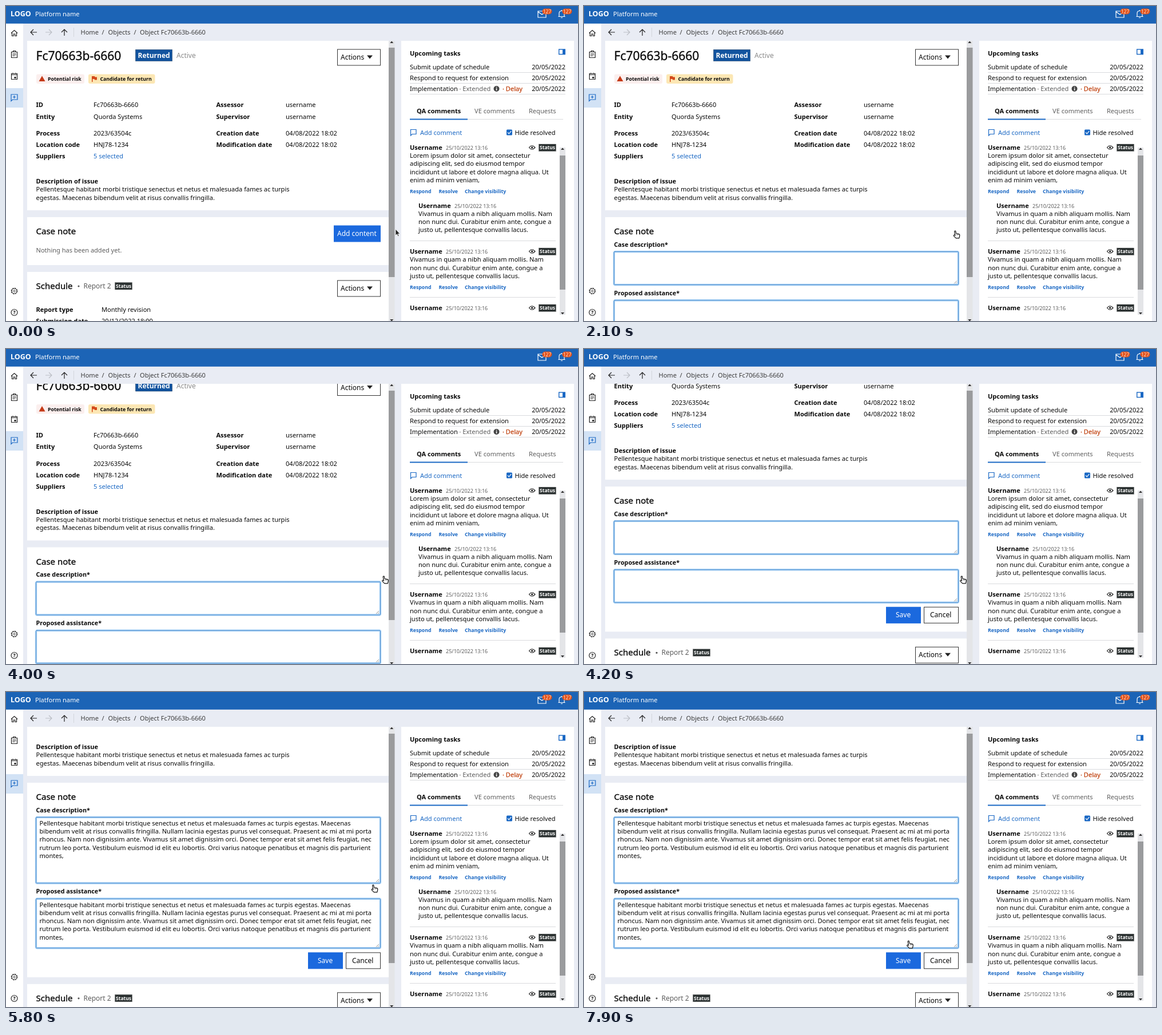
Animation, 1000 px wide and 552 px high, one loop 8000 ms. Source, as an HTML page:

```html
<!DOCTYPE html>
<html lang="en">
<head>
<meta charset="utf-8">
<title>Case note form</title>
<style>
html, body { margin: 0; width: 100%; height: 100%; overflow: hidden; background: #e9ecf4 }
svg { display: block; width: 100%; height: 100% }
text { font: 11.05px "Noto Sans", "Open Sans", sans-serif; fill: #080808; white-space: pre }
.b { font-weight: 700 }
.s { font-weight: 600 }
.f { font-size: 10.75px; font-weight: 600 }
.h { font-size: 15px; stroke: #080808; stroke-width: .3 }
.m { font-size: 12px }
.g { fill: #5c5c5c }
.l { fill: #1a68c4 }
.w { fill: #fff }
.t { font-size: 9px }
.t.s { font-size: 8.75px }
.line { fill: none; stroke: #222; stroke-width: 1.2 }
</style>
</head>
<body>
<svg id="stage" viewBox="0 0 1000 552"></svg>
<script>
const T = (x, y, s, cls = '', more = '') => `<text x="${x}" y="${y}" class="${cls}" ${more}>${s}</text>`;
const R = (x, y, w, h, fill, more = '') => `<rect x="${x}" y="${y}" width="${w}" height="${h}" fill="${fill}" ${more}/>`;
const P = (d, fill, more = '') => `<path d="${d}" fill="${fill}" ${more}/>`;
const L = (d, more = '') => `<path d="${d}" class="line" ${more}/>`;
const G = (id, body) => `<g id="${id}">${body}</g>`;
const lines = (x, y, list) => list.map((s, i) => T(x, y + i * 14.3, s)).join('');
const card = (y, h) => R(37, y, 632, h, '#fff');
const button = (x, y, w, s, tx, solid) =>
  R(x + .5, y + .5, w - 1, 28, solid ? '#1b69de' : '#fff', `stroke="${solid ? '#1b69de' : '#333'}"`) +
  T(tx, y + 18.6, s, solid ? 'm w' : 'm');
const actions = y => button(579, y, 76, 'Actions', 585) + P(`M631 ${y + 11}h10l-5 6z`, '#222');
const status = (x, y) => R(x, y, 30, 12.5, '#2b3131', 'stroke="#555" stroke-width=".6" stroke-dasharray="1 1"') +
  T(x + 1.6, y + 9.4, 'Status', 's w', 'style="font-size:8.5px"');
const field = id => R(52.5, 0, 602, 58, '#fff', `id="${id}o" rx="2" stroke="#a3d0f7" stroke-width="3.4"`) +
  R(52.5, 0, 602, 58, 'none', `id="${id}i" rx="1.5" stroke="#12549f" stroke-dasharray="1 1"`) +
  `<path id="${id}h" d="M647 -2l5-5M650 -2l2-2" stroke="#777" stroke-width=".8"/>`;

const lorem = ['Pellentesque habitant morbi tristique senectus et netus et malesuada fames ac turpis egestas. Maecenas',
  'bibendum velit at risus convallis fringilla. Nullam lacinia egestas purus vel consequat. Praesent ac mi at mi porta',
  'rhoncus. Nam non dignissim ante. Vivamus sit amet dignissim orci. Donec tempor erat sit amet felis feugiat, nec',
  'rutrum leo porta. Vestibulum euismod id elit eu lobortis. Orci varius natoque penatibus et magnis dis parturient',
  'montes,'];

function header() {
  const badge = x => R(x - 8.5, 4.5, 17, 10, '#e2531d', 'rx="5"') +
    T(x, 12.6, '127', '', 'text-anchor="middle" style="font-size:8.5px;fill:#ffdcc4"');
  return R(0, 0, 1000, 30.8, '#1c64b6') +
    T(8, 18.4, 'LOGO', 'b w', 'style="font-size:12.5px"') + T(51, 18, 'Platform name', 'w') +
    L('M930 9h14v11h-14zM930 10l7 5 7-5', 'style="stroke:#fff"') +
    L('M965.5 18.5h12M967 18v-5q0-4.5 4.5-4.5t4.5 4.5v5M970 20.5h3M971.5 7v1.5', 'style="stroke:#fff"') +
    badge(946) + badge(981);
}

function sidebar() {
  const ring = (r, more = '') => `<circle cx="14.5" cy="499.5" r="${r}" class="line" ${more}/>`;
  return R(0, 30, 30, 522, '#fff') + R(0, 144, 30, 34, '#d2e2f5') +
    L('M9 47.5l5.5-5 5.5 5M10.5 47v5.5h2.7v-3.5h2.6v3.5h2.7v-5.5') +
    L('M9.5 80.5h10v10h-10zM12.5 80v-1.5h4v1.5') + L('M11.5 83.5h6M11.5 85.5h6M11.5 87.5h4', 'style="stroke-width:.8"') +
    L('M9.5 118.5h10v10h-10zM9.5 120.500h10M12 117v2M17 117v2') + R(14.5, 124, 3, 3, '#222') +
    L('M9 155h11v9h-8.5l-2.500 2.500zM14.500 157v5M12 159.500h5', 'style="stroke:#1a68c4"') +
    ring(4.5) + ring(5.4, 'stroke-dasharray="2.12 2.12" style="stroke-width:1"') + ring(1.6, 'style="stroke-width:.9"') +
    '<circle cx="14.5" cy="537" r="5.5" class="line"/>' + T(14.5, 540.2, '?', 's t', 'text-anchor="middle"');
}

function toolbar() {
  return L('M54 46H43M48 41l-5 5 5 5') + L('M69 46h11M75 41l5 5-5 5', 'style="stroke:#bbbec5"') +
    L('M102 52V41M97 46l5-5 5 5') + R(118, 38, 1, 16, '#d3d6dc') +
    [[130.5, 'Home'], [167.5, '/'], [178.5, 'Objects'], [223.5, '/'], [234, 'Object Fc70663b-6660']]
      .map(([x, s]) => T(x, 50, s, '', 'style="fill:#3c3c3c"')).join('');
}

function issue() {
  const rows = [[177, 'ID', 'Fc70663b-6660', 'Assessor', 'username'],
    [197.5, 'Entity', 'Quorda Systems', 'Supervisor', 'username'],
    [227, 'Process', '2023/63504c', 'Creation date', '04/08/2022 18:02'],
    [247, 'Location code', 'HNJ78-1234', 'Modification date', '04/08/2022 18:02']];
  return card(50, 308) + T(52.5, 94.5, 'Fc70663b-6660', 'h', 'style="font-size:21px"') +
    R(226.5, 76.5, 64, 20, '#12549f', 'stroke="#0b2c55" stroke-dasharray="1 1"') +
    T(230.5, 91, 'Returned', 's m w') + T(298, 91, 'Active', 'm', 'style="fill:#8b8b8b"') + actions(75.5) +
    R(53, 119.5, 84, 16.5, '#fbefee', 'rx="3"') + P('M57.5 132l5.5-9.5 5.5 9.5z', '#c53a17') +
    T(73, 131, 'Potential risk', 's t') +
    R(144, 119.5, 116.5, 16.5, '#fce7b4', 'rx="3"') + P('M150 123h5l.5 1.5h3.5v5h-4l-.5-1.5h-3v5h-1.5z', '#d4491a') +
    T(164.5, 131, 'Candidate for return', 's t') +
    rows.map(([y, a, b, c, d]) => T(52.5, y, a, 'b') + T(153, y, b) + T(367.5, y, c, 'b') + T(489, y, d)).join('') +
    T(52.5, 267, 'Suppliers', 'b') + T(153, 267, '5 selected', 'l') +
    T(52.5, 311, 'Description of issue', 'b') +
    lines(52.5, 325.3, ['Pellentesque habitant morbi tristique senectus et netus et malesuada fames ac turpis',
      'egestas. Maecenas bibendum velit at risus convallis fringilla.']);
}

function schedule() {
  return card(0, 300) + T(52.5, 30, 'Schedule', 'h') + '<circle cx="127" cy="25" r="1.6" fill="#555"/>' +
    T(135.5, 29, 'Report 2', 'm g') + status(190.5, 18.5) + actions(14.5) +
    T(52.5, 70, 'Report type', 'b') + T(167, 70, 'Monthly revision') +
    T(52.5, 89.5, 'Submission date', 'b') + T(167, 89.5, '20/12/2022 18:00');
}

function scrollbar(x, top, bottom, y, h, w) {
  const c = x + w / 2;
  return R(x, top, w, bottom - top, '#e4e5e8') + R(x, y, w, h, '#9a9b9d') +
    P(`M${c - 3} ${top + 4}h6l-3-3.5zM${c - 3} ${bottom - 4}h6l-3 3.5z`, '#333');
}

function panel() {
  const rule = (y, x2) => R(706, y, x2 - 706, 1, '#d9dadd');
  const user = (x, y) => T(x, y, 'Username', 'b') + T(x + 63, y, '25/10/2022 13:16', 't g');
  const marks = y => L(`M914.5 ${y}q5-6.5 10.5 0q-5.5 6.5-10.5 0z`) +
    `<circle cx="919.7" cy="${y}" r="1.7" fill="#222"/>` + status(931.5, y - 6);
  const links = y => [[706, 'Respond'], [756.5, 'Resolve'], [802, 'Change visibility']]
    .map(([x, s]) => T(x, y, s, 's t l')).join('');
  const task = (y, s) => T(706, y, s) + T(978, y, '20/05/2022', '', 'text-anchor="end"') + rule(y + 5, 978);
  const reply = ['Vivamus in quam a nibh aliquam mollis. Nam', 'non nunc dui. Curabitur enim ante, congue a',
    'justo ut, pellentesque convallis lacus.'];
  return R(691, 61, 302, 491, '#fff') + T(706, 87, 'Upcoming tasks', 'b') +
    R(966.7, 76, 10.6, 8.6, '#fff', 'stroke="#1a68c4" stroke-width="1.4"') + R(973, 76, 4, 8.6, '#1a68c4') +
    task(111, 'Submit update of schedule') + task(130, 'Respond to request for extension') + task(149, 'Implementation') +
    T(792.5, 149, '· Extended', 'g') +
    '<circle cx="857.5" cy="145" r="5" fill="#444"/>' + R(856.8, 144, 1.5, 4, '#fff') + R(856.8, 141.7, 1.5, 1.4, '#fff') +
    T(868, 149, '· Delay', '', 'style="fill:#c0410f;stroke:#c0410f;stroke-width:.25"') +
    T(718, 188, 'QA comments', 'b') + T(819, 188, 'VE comments', 'g') + T(914, 188, 'Requests', 'g') +
    rule(198, 974) + R(706, 197.5, 101, 2, '#1a68c4') +
    L('M707.5 216.5h9.5v8h-7l-2.5 2.5z', 'style="stroke:#1a68c4"') + T(724, 225.7, 'Add comment', 'l') +
    R(875, 216.5, 10, 10, '#1a68c4', 'rx="1.5"') + L('M877 221.5l2.3 2.3 4-4.6', 'style="stroke:#fff"') +
    T(889.5, 225.5, 'Hide resolved') +
    user(706, 252) + marks(248) +
    lines(706, 266, ['Lorem ipsum dolor sit amet, consectetur', 'adipiscing elit, sed do eiusmod tempor',
      'incididunt ut labore et dolore magna aliqua. Ut', 'enim ad minim veniam,']) + links(328) +
    user(721, 353.5) + lines(721, 367.8, reply) + rule(411, 961) +
    user(706, 434) + marks(430) + lines(706, 448.3, reply) + links(496) + rule(510, 961) +
    user(706, 533) + marks(529) + scrollbar(968, 248, 541, 262, 235, 10);
}

const closed = card(370, 84) + T(52.5, 400, 'Case note', 'h') +
  button(573, 384.5, 82, 'Add content', 579, true) + T(52.5, 432, 'Nothing has been added yet.', 'g');
const open = R(37, 370, 632, 255, '#fff', 'id="formCard"') + T(52.5, 400, 'Case note', 'h') +
  T(52.5, 421.5, 'Case description*', 'f') +
  '<g transform="translate(0 430.5)">' + field('a') + G('textA', lines(58.5, 14.3, lorem)) + '</g>' +
  G('second', T(52.5, -9, 'Proposed assistance*', 'f') + field('b') + G('textB', lines(58.5, 14.3, lorem))) +
  G('buttons', button(528, 7.5, 61, 'Save', 545, true) + button(594, 7.5, 61, 'Cancel', 605));

const stage = document.getElementById('stage');
stage.innerHTML = '<clipPath id="view"><path d="M37 61h643v491H37z"/></clipPath>' +
  R(0, 0, 1000, 552, '#e9ecf4') + sidebar() + header() + toolbar() +
  `<g clip-path="url(#view)">${G('page', issue() + G('closed', closed) + G('open', open) + G('schedule', schedule()))}</g>` +
  scrollbar(669, 61, 553, 73, 402, 10.5) + panel() +
  G('arrow', P('M0 0v11l2.6-2.2 1.7 3.7 1.7-.8-1.7-3.5h3.3z', '#222', 'stroke="#fff" stroke-width=".7"')) +
  G('hand', P('M-.8 .6C-.8-.7 1.2-.7 1.4 .6L2 4 7 5.2C8.4 5.6 8.4 7 8.2 8.5L7.3 12.3H1.8L-2.2 8.3C-2.7 7.1-1.4 6.2-.4 7.1L.4 7.7Z', '#fff',
    'stroke="#111" stroke-width="1.2" stroke-linejoin="round"') + L('M3.3 5v2M5.3 5.5v1.7', 'style="stroke-width:.8"'));

const el = id => document.getElementById(id);
const show = (id, on) => el(id).setAttribute('visibility', on ? 'visible' : 'hidden');
const move = (id, x, y) => el(id).setAttribute('transform', `translate(${x} ${y})`);

// Linear value between [time, value] keys
function at(t, keys) {
  const i = keys.findIndex(k => k[0] > t);
  if (i < 0) return keys[keys.length - 1][1];
  if (!i) return keys[0][1];
  const [t0, a] = keys[i - 1], [t1, b] = keys[i];
  return a + (b - a) * (t - t0) / (t1 - t0);
}

const scrollKeys = [[3000, 0], [3100, 3], [3900, 12], [4000, 22.5], [4200, 129], [4300, 170], [4400, 198], [4500, 211]];
const xKeys = [[300, 681], [1000, 648.5], [2300, 648.5], [2800, 660], [4500, 660], [4800, 630], [5000, 630], [5300, 648], [5700, 648], [5800, 641.5], [6400, 567]];
const yKeys = [[300, 391], [1000, 394.5], [2300, 394.5], [2800, 398.5], [4500, 398.5], [4800, 255], [5000, 255], [5300, 304], [5700, 334], [5800, 338.5], [6400, 436.5]];

function resize(id, h) {
  el(id + 'o').setAttribute('height', h);
  el(id + 'i').setAttribute('height', h);
  move(id + 'h', 0, h);
}

function draw(now) {
  const t = Math.floor(now % 8000 / 100) * 100;
  const opened = t >= 1400, filled = t >= 4900, hand = t >= 900;
  const h1 = filled ? at(t, [[5300, 86.5], [5700, 115.5]]) : 58;
  const h2 = filled ? 86.5 : 57.5;
  const top2 = 430.5 + h1 + 27.3, end = top2 + h2;

  show('closed', !opened);
  show('open', opened);
  show('textA', opened && filled);
  show('textB', opened && filled);
  resize('a', h1);
  resize('b', h2);
  move('second', 0, top2);
  move('buttons', 0, end);
  el('formCard').setAttribute('height', end + 51 - 370);
  move('schedule', 0, opened ? end + 63 : 466);
  move('page', 0, -at(t, scrollKeys));

  show('arrow', !hand);
  show('hand', hand);
  move(hand ? 'hand' : 'arrow', at(t, xKeys), at(t, yKeys));
  requestAnimationFrame(draw);
}
draw(0);
</script>
</body>
</html>
```
